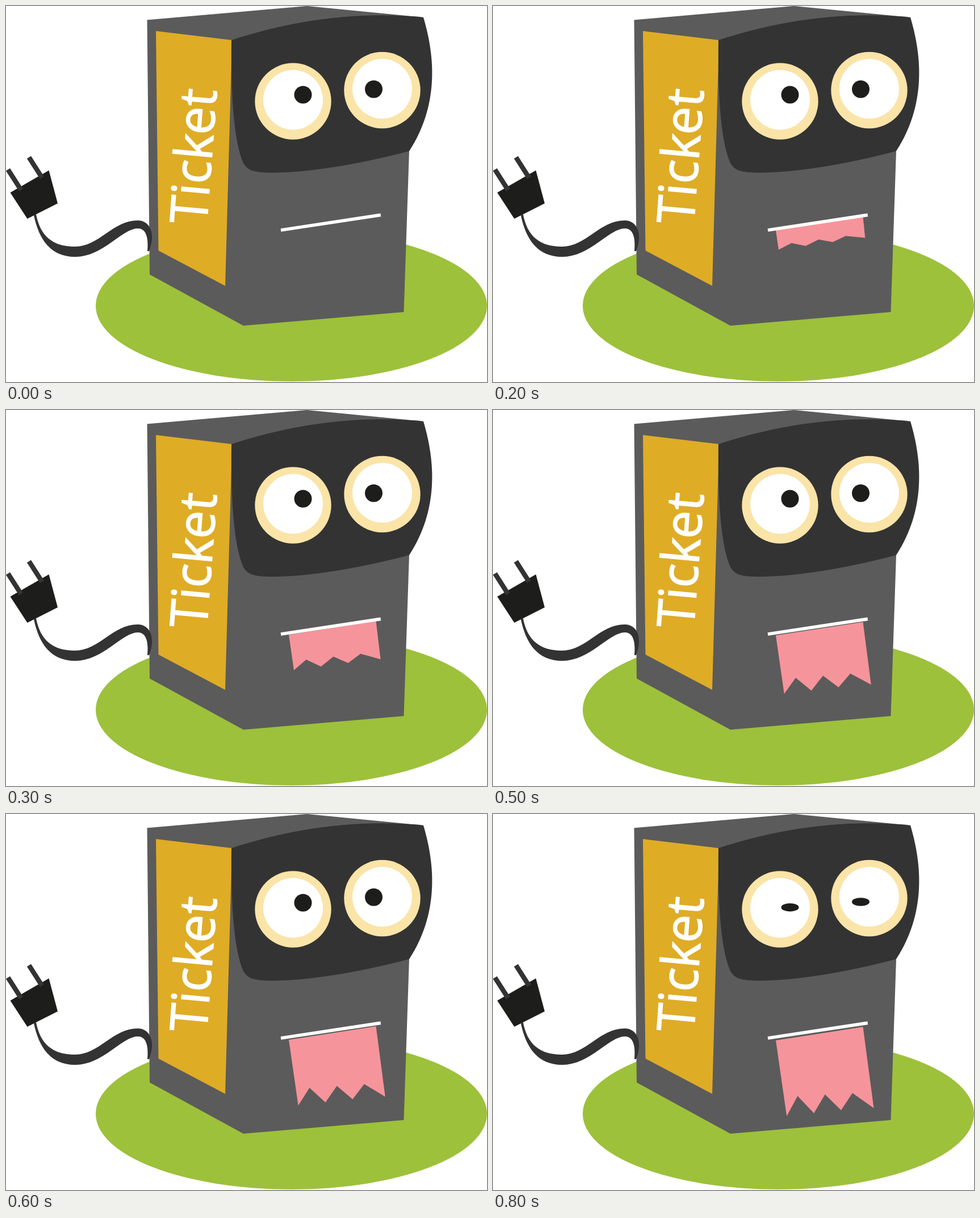
Animation of 847 by 661 pixels, one loop 900 ms. Source, as an HTML page with a canvas:

```html
<!DOCTYPE html>
<html lang="en">
<head>
<meta charset="utf-8">
<title>Ticket machine</title>
<style>
  html, body { margin: 0; width: 100%; height: 100%; overflow: hidden; background: #fff; }
  canvas { display: block; }
</style>
</head>
<body>
<canvas id="stage" width="847" height="661"></canvas>
<script>
const ctx = document.getElementById('stage').getContext('2d');
const STEP = 100, STEPS = 9;
const GREY = '#5b5b5b', DARK = '#333333', BLACK = '#1d1d1b', PINK = '#f6949b';

const clamp = v => Math.min(1, Math.max(0, v));

function fillPath(color, d) {
  ctx.fillStyle = color;
  ctx.fill(new Path2D(d));
}

function ellipse(color, x, y, rx, ry = rx) {
  ctx.fillStyle = color;
  ctx.beginPath();
  ctx.ellipse(x, y, rx, ry, 0, 0, Math.PI * 2);
  ctx.fill();
}

function line(color, width, x, y, dx, dy) {
  ctx.strokeStyle = color;
  ctx.lineWidth = width;
  ctx.beginPath();
  ctx.moveTo(x, y);
  ctx.lineTo(x + dx, y + dy);
  ctx.stroke();
}

function drawBody() {
  ellipse('#9dc13b', 502.5, 527, 344.5, 133);
  fillPath(GREY, 'M248.5 24.5L530 0L735 20L710 255L700.5 538L418 562L253 472Z');
  fillPath('#dfac26', 'M264 44L398 60L386 492L268.5 430Z');
  fillPath(DARK, 'M397 60C500 26 620 8 735 20C756 90 762 175 710 255' +
    'C620 279 530 293 470 293C435 293 424 289 417 274C398 228 396 130 397 60Z');
}

// The word lies in the slanted plane of the side panel
function drawLabel() {
  ctx.save();
  ctx.transform(0.072, -0.965, 1, 0.09, 353.5, 385.5);
  ctx.font = '91px "Open Sans", "Noto Sans", sans-serif';
  ctx.fillStyle = ctx.strokeStyle = '#fff';
  ctx.lineWidth = 1.4;
  ctx.fillText('Ticket', 0, 0);
  ctx.strokeText('Ticket', 0, 0);
  ctx.restore();
}

function drawPlug() {
  fillPath(DARK, 'M53 366C60 404 82 423 121 423C165 423 187 377 232 377C254 377 264 401 252 431' +
    'L249 431C251 410 248 391 232 391C205 391 170 441 122 441C78 441 58 410 49 368Z');
  fillPath(BLACK, 'M7.5 328L75.5 289L91 347L37.5 374Z');
  for (const i of [0, 1]) line(DARK, 8.5, 3.5 + 37 * i, 287.5 - 21.5 * i, 23, 36);
}

function drawEye(x, y, pupilX, pupilY, open) {
  const r = 15.5;
  ellipse('#fbe4a8', x, y, 67.2);
  ellipse('#fff', x, y - 2.5, 52.5);
  // The lower rim of the pupil stays in place as it closes
  ellipse(BLACK, pupilX, pupilY + r * (1 - open), r, r * open);
}

function drawPaper(length) {
  if (length > 0) {
    const top = 394 + 4 * length ** 2;
    // u runs across the slot, v along the paper
    const at = (u, v) => [498 + 153.5 * u + 19 * length * v, top - 23.7 * u + 132 * length * v];
    const edge = [at(1, 0), at(0, 0)];
    for (let i = 0; i < 6; i++) {
      edge.push(at(0.155 * i, i % 2 ? 0.75 + 0.018 * i : 1.01 + 0.008 * i));
    }
    edge.push(at(0.99, 1.08));
    fillPath(PINK, 'M' + edge.join('L') + 'Z');
  }
  line('#fff', 5.8, 484, 394, 175.8, -26.7);
}

// Fast start, long slow finish
const feed = t => t + 0.96 * t * (1 - t) ** 1.2;

function draw(now) {
  const step = Math.floor(now / STEP) % STEPS;
  const open = 1 - 0.53 * clamp((step - 6) / 2);
  ctx.fillStyle = '#fff';
  ctx.fillRect(0, 0, 847, 661);
  drawBody();
  drawLabel();
  drawPlug();
  drawEye(505.5, 167.5, 523, 156, open);
  drawEye(662.5, 148, 647.5, 146.3, open);
  drawPaper(feed(clamp((step - 1) / 7)));
}

const start = performance.now();
function tick() {
  draw(performance.now() - start);
  requestAnimationFrame(tick);
}
tick();
</script>
</body>
</html>
```
